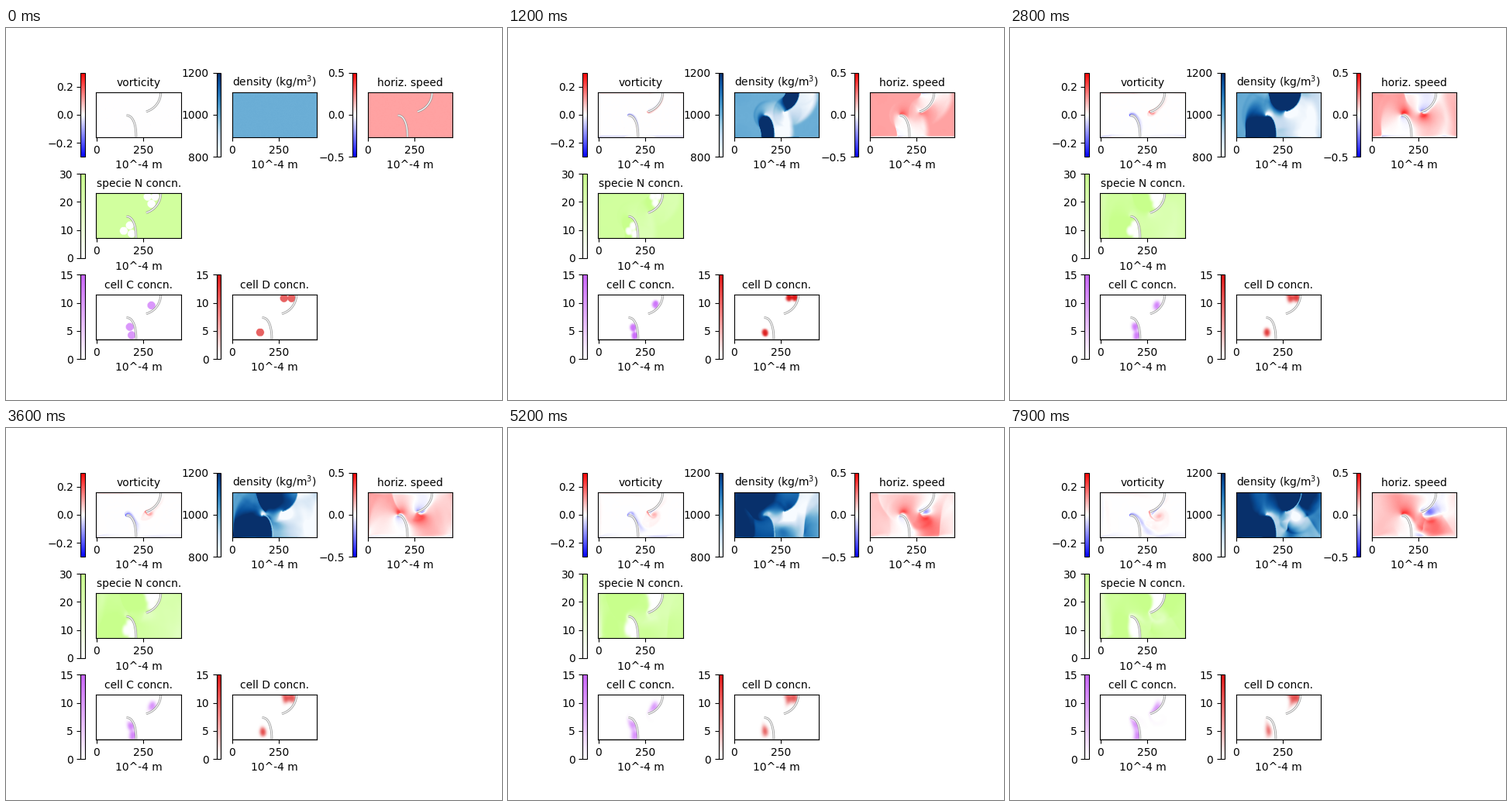
A matplotlib script for the animation above (8 s loop, 640x480 px).

```python
import numpy as np
import matplotlib.pyplot as plt
from matplotlib.animation import FuncAnimation
from matplotlib.colors import LinearSegmentedColormap

W, H, CELL = 225, 119, 2          # lattice size and units per lattice cell
FRAMES, STEPS = 80, 5.5           # lattice steps per frame, on average
U0, NU, DIFF = 0.183, 0.03, 0.03
UMAX = 0.42
OMEGA = 1 / (3 * NU + 0.5)

# D2Q9 directions
EX = np.array([0, 1, 0, -1, 0, 1, -1, -1, 1])
EY = np.array([0, 0, 1, 0, -1, 1, 1, -1, -1])
WT = np.array([4 / 9] + [1 / 9] * 4 + [1 / 36] * 4, np.float32)
OPP = [0, 3, 4, 1, 2, 7, 8, 5, 6]

# stress moments and the matching second-order Hermite weights
MOMENTS = np.stack([EX * EX, EX * EY, EY * EY]).astype(np.float32)
HERMITE = (4.5 * WT * np.stack([EX * EX - 1 / 3, 2 * EX * EY,
                                EY * EY - 1 / 3])).T.astype(np.float32)
RELAX = (1 - OMEGA) * HERMITE @ MOMENTS
RELAX = RELAX.astype(np.float32)

yy, xx = np.mgrid[0:H, 0:W].astype(np.float32) * CELL
TOP = H * CELL


def arc(cx, cy, a, b, end, power=1.0):
    t = np.radians(np.linspace(0, abs(end), 160))
    y = np.sin(t) ** power * np.sign(end)
    return cx + a * np.abs(np.cos(t)) ** power, cy + b * y


ARCS = [arc(160, 0, 51, 115, 90, 0.88), arc(235, TOP, 107, 107, -74)]


def make_walls():
    walls = np.zeros((H, W), bool)
    walls[0] = True
    for px, py in ARCS:
        for x, y in zip(px, py):
            walls |= (xx - x) ** 2 + (yy - y) ** 2 < 3.6 ** 2
    return walls


def discs(spots):
    c = np.zeros((H, W), np.float32)
    for x, y in spots:
        c[(xx - x) ** 2 + (yy - y) ** 2 < 21 ** 2] = 10
    return c


def equilibrium(rho, ux, uy):
    base = 1 - 1.5 * (ux * ux + uy * uy)
    out = np.empty((9,) + rho.shape, np.float32)
    for i in range(9):
        eu = 3 * (EX[i] * ux + EY[i] * uy)
        out[i] = WT[i] * rho * (base + eu + 0.5 * eu * eu)
    return out


def simulate():
    rng = np.random.default_rng(4)
    walls = make_walls()
    fluid = ~walls
    open_x = (fluid & np.roll(fluid, -1, 1)).astype(np.float32)
    open_y = (fluid & np.roll(fluid, -1, 0)).astype(np.float32)

    def jitter():
        return rng.normal(0, 0.0025, (H, W)).astype(np.float32)

    rho, ux, uy = 1 + jitter(), U0 + jitter(), jitter()
    f = equilibrium(rho, ux, uy)
    one = np.ones((1, 1), np.float32)
    inlet = equilibrium(one, one * U0, one * 0)[:, 0, 0]

    cell_c = discs([(178, 66), (188, 22), (292, 180)])
    cell_d = discs([(146, 37), (272, 218), (312, 218)])
    food = np.where(cell_c + cell_d > 0, 0, 25).astype(np.float32)
    conc = np.stack([food, cell_c, cell_d])

    def transport(axis, vel, gate):
        nxt = np.roll(conc, -1, axis + 1)
        v = 0.5 * (vel + np.roll(vel, -1, axis)) * gate
        flux = np.maximum(v, 0) * conc + np.minimum(v, 0) * nxt
        flux -= DIFF * gate * (nxt - conc)
        return np.roll(flux, 1, axis + 1) - flux

    def snapshot():
        curl = (np.roll(uy, -1, 1) - np.roll(uy, 1, 1)
                - np.roll(ux, -1, 0) + np.roll(ux, 1, 0)) * 0.5
        curl[:, [0, -1]] = 0
        curl[walls] = 0
        return [curl, rho * 1000, ux.copy(), *conc.copy()]

    shots = [snapshot()]
    for k in range(1, FRAMES):
        for _ in range(int(k * STEPS) - int((k - 1) * STEPS)):
            for i in range(1, 9):
                f[i] = np.roll(f[i], (EY[i], EX[i]), (0, 1))
            f[:, walls] = f[OPP][:, walls]
            rho = np.maximum(f.sum(0), 0.3)
            ux = (f[1] + f[5] + f[8] - f[3] - f[6] - f[7]) / rho
            uy = (f[2] + f[5] + f[6] - f[4] - f[7] - f[8]) / rho
            ux[walls] = uy[walls] = 0
            limit = np.minimum(1, UMAX / (np.hypot(ux, uy) + 1e-6))
            ux, uy = ux * limit, uy * limit
            feq = equilibrium(rho, ux, uy)
            neq = (RELAX @ (f - feq).reshape(9, -1)).reshape(f.shape)
            f = np.where(fluid, feq + neq, f)
            for i in (1, 5, 8):
                f[i, 1:, 0] = inlet[i]
            conc = conc + transport(1, ux, open_x) + transport(0, uy, open_y)
            conc[0] *= 1 - np.minimum(0.0015 * (conc[1] + conc[2]), 0.5)
            conc[:, 1:, 0] = np.array([[25], [0], [0]])
        shots.append(snapshot())
    return shots


def fade(color):
    return LinearSegmentedColormap.from_list(color, ["white", color])


PANELS = [  # row, column, title, colormap, low, high
    (0, 0, "vorticity", "bwr", -0.3, 0.3),
    (0, 1, "density (kg/m$^3$)", "Blues", 800, 1200),
    (0, 2, "horiz. speed", "bwr", -0.5, 0.5),
    (1, 0, "specie N concn.", fade("#c8ff8c"), 0, 30),
    (2, 0, "cell C concn.", fade("#c864fa"), 0, 15),
    (2, 1, "cell D concn.", fade("#dc1414"), 0, 15),
]

shots = simulate()
fig, axes = plt.subplots(3, 3, figsize=(6.4, 4.8), dpi=100)
images = []
for k, (r, c, title, cmap, lo, hi) in enumerate(PANELS):
    ax = axes[r, c]
    im = ax.imshow(shots[0][k], cmap=cmap, vmin=lo, vmax=hi, origin="lower",
                   extent=(-0.5, W * CELL - 0.5, -0.5, TOP - 0.5))
    fig.colorbar(im, ax=ax, location="left")
    ax.set_title(title, fontsize=10)
    ax.set_xlabel("10^-4 m")
    ax.set_xticks([0, 250])
    ax.set_yticks([])
    if k != 1:
        for px, py in ARCS:
            ax.plot(px, py, color="0.58", lw=2, solid_capstyle="butt")
            ax.plot(px, py, color="1", lw=0.9, solid_capstyle="butt")
        ax.axhline(1, color="0.6", lw=0.4)
        ax.set_xlim(-0.5, W * CELL - 0.5)
        ax.set_ylim(-0.5, TOP - 0.5)
    images.append(im)
for r, c in ((1, 1), (1, 2), (2, 2)):
    axes[r, c].remove()


def update(i):
    for im, data in zip(images, shots[i]):
        im.set_data(data)
    return images


anim = FuncAnimation(fig, update, frames=FRAMES, interval=100,
                     repeat=True, repeat_delay=0, blit=False)
plt.show()
```
